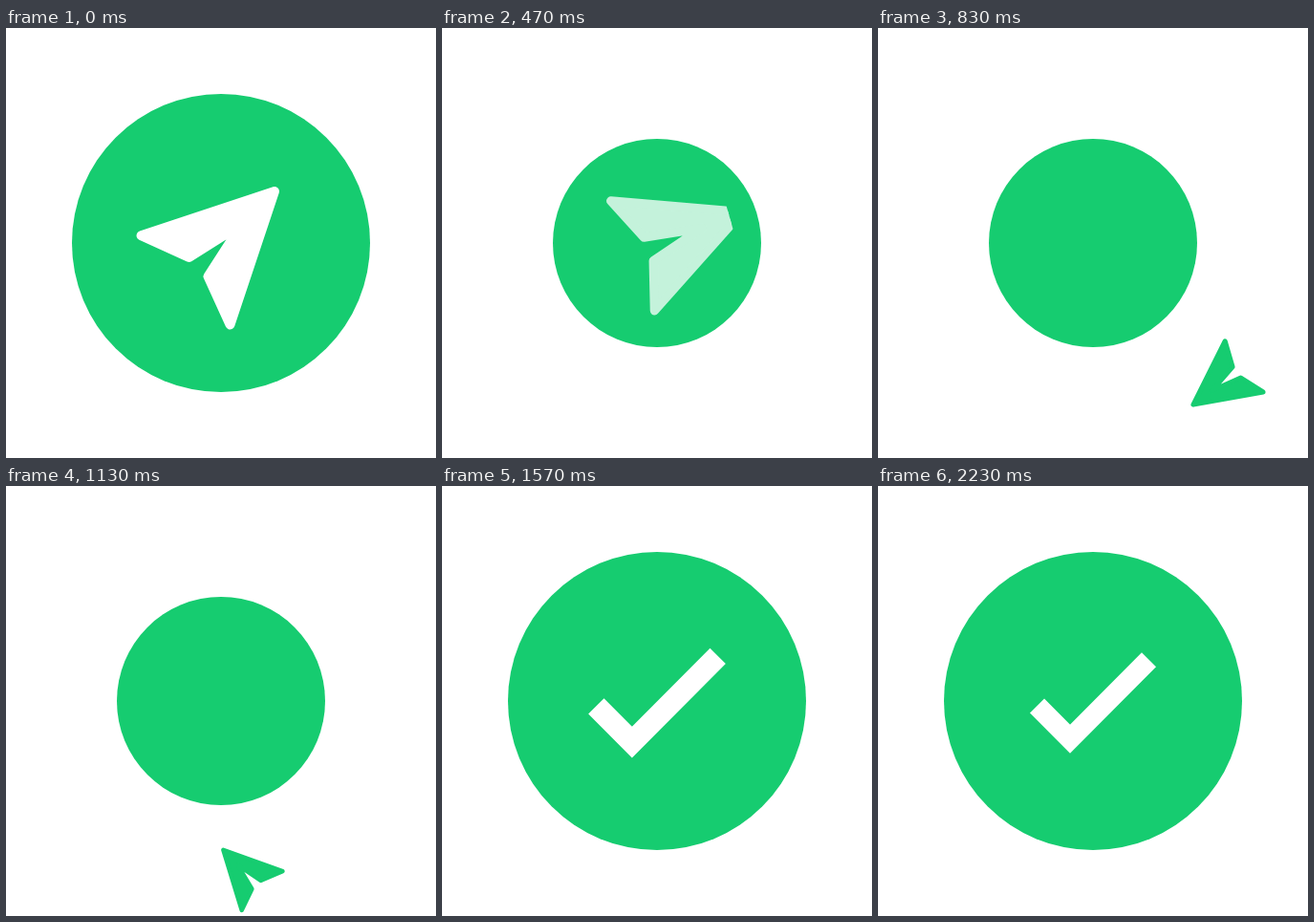
Write an HTML page with a canvas that moves like this. It is 450x450 px and loops after 2260 ms.

```html
<!DOCTYPE html>
<html lang="en">
<head>
<meta charset="utf-8">
<title>Send button</title>
<style>
html, body { margin: 0; width: 100%; height: 100%; overflow: hidden; background: #fff; }
canvas { display: block; width: 450px; height: 450px; }
</style>
</head>
<body>
<canvas id="stage" width="450" height="450"></canvas>
<script>
const ctx = document.getElementById('stage').getContext('2d');
const LOOP = 2260, STEP = 100 / 3, CENTER = 225;
const LAUNCH = 266, TURN = 833, ARRIVE = 1367;
const GREEN = [22, 204, 112], WHITE = [255, 255, 255];

// Plane and check outlines, relative to their own middle.
const PLANE = [[56, -54], [-83.5, -7.8], [-33.5, 15], [22, -20], [-13.5, 35], [9.5, 85.5]];
const CHECK = [[-58.5, 3], [-24, 37.8], [58.5, -45.2]];

// The flight: out to the right and around, then back in from below.
const OUTBOUND = [[210, 243], [290, 155], [514, 257], [362, 371]];
const RETURN = [[362, 371], [270, 440], [225, 450], [225, 261]];

const rgb = c => `rgb(${c.map(Math.round).join(',')})`;
const mix = (a, b, p) => a.map((v, i) => v + (b[i] - v) * p);
const progress = (t, from, to) => Math.min(1, Math.max(0, (t - from) / (to - from)));
const easeInOut = p => p < 0.5 ? 4 * p ** 3 : 1 - 4 * (1 - p) ** 3;
const easeOut = p => 1 - (1 - p) ** 3;
const easeOutBack = p => 1 + 2.7 * (p - 1) ** 3 + 1.7 * (p - 1) ** 2;

// Point and direction on a cubic Bezier curve.
function along([a, b, c, d], u) {
  const ab = mix(a, b, u), bc = mix(b, c, u), cd = mix(c, d, u);
  const from = mix(ab, bc, u), to = mix(bc, cd, u);
  return { pos: mix(from, to, u), angle: Math.atan2(to[1] - from[1], to[0] - from[0]) };
}

function flight(t) {
  if (t < LAUNCH) {
    const pull = easeInOut(progress(t, 0, LAUNCH));
    return { pos: mix([CENTER, CENTER], OUTBOUND[0], pull), angle: -Math.PI / 4, scale: 1 };
  }
  if (t < TURN) {
    const u = progress(t, LAUNCH, TURN) ** 2;
    return { ...along(OUTBOUND, u), scale: 1 - 0.495 * u };
  }
  const u = progress(t, TURN, ARRIVE);
  return { ...along(RETURN, u), scale: 0.505 - 0.1 * u };
}

function trace(points) {
  ctx.beginPath();
  points.forEach(([x, y]) => ctx.lineTo(x, y));
}

function discPath(radius) {
  ctx.beginPath();
  ctx.arc(CENTER, CENTER, radius, 0, Math.PI * 2);
}

function drawPlane(t) {
  const { pos, angle, scale } = flight(t);
  const fade = progress(t, 433, 566);
  ctx.save();
  if (t > 400 && fade < 1) {
    // The white plane is cut off along a slanted edge as it leaves.
    trace([[0, 0], [244.4, 0], [373, 450], [0, 450]]);
    ctx.clip();
  }
  ctx.translate(...pos);
  ctx.rotate(angle + Math.PI / 4);
  ctx.scale(scale, scale);
  ctx.fillStyle = ctx.strokeStyle = rgb(mix(WHITE, GREEN, fade));
  ctx.lineWidth = 10;
  ctx.lineJoin = 'round';
  trace(PLANE);
  ctx.closePath();
  ctx.fill();
  ctx.stroke();
  ctx.restore();
}

function drawDot(t, radius) {
  const y = RETURN[3][1] - 0.35 * (t - ARRIVE);
  const trail = 32 * (1 - progress(t, ARRIVE, 1467));
  ctx.save();
  discPath(radius);
  ctx.clip();
  ctx.fillStyle = '#fff';
  ctx.beginPath();
  ctx.ellipse(CENTER, y, 9, 11.5, 0, 0, Math.PI * 2);
  ctx.fill();
  ctx.fillRect(221, y + 44, 1, trail);
  ctx.fillRect(228, y + 35, 1, trail);
  ctx.restore();
}

function drawCheck(t) {
  const scale = easeOutBack(progress(t, 1433, 1633));
  ctx.save();
  ctx.translate(CENTER, 227);
  ctx.scale(scale, scale);
  ctx.strokeStyle = '#fff';
  ctx.lineWidth = 21.2;
  trace(CHECK);
  ctx.stroke();
  ctx.restore();
}

function drawRays(t) {
  const outer = 100 + 37.5 * easeOut(progress(t, 1567, 2000));
  const inner = 100 + 37.5 * progress(t, 1567, 2233) ** 1.5;
  ctx.save();
  ctx.translate(222.25, 224.75);
  ctx.fillStyle = '#fff';
  for (let i = 0; i < 8; i++) {
    ctx.fillRect(0.4, -outer, 5, outer - inner);
    ctx.rotate(Math.PI / 4);
  }
  ctx.restore();
}

function draw(t) {
  const shrink = easeInOut(progress(t, 0, 210)) - easeInOut(progress(t, 1190, 1555));
  const radius = 156 - 47 * shrink;
  ctx.fillStyle = '#fff';
  ctx.fillRect(0, 0, 450, 450);
  ctx.fillStyle = rgb(GREEN);
  discPath(radius);
  ctx.fill();
  if (t < 1300) drawPlane(t);
  else if (t < 1480) drawDot(t, radius);
  if (t > 1433) drawCheck(t);
  if (t > 1567) drawRays(t);
}

const start = performance.now();
function tick() {
  const t = (performance.now() - start) % LOOP;
  draw(Math.floor((t + 4) / STEP) * STEP);
  requestAnimationFrame(tick);
}
tick();
</script>
</body>
</html>
```
